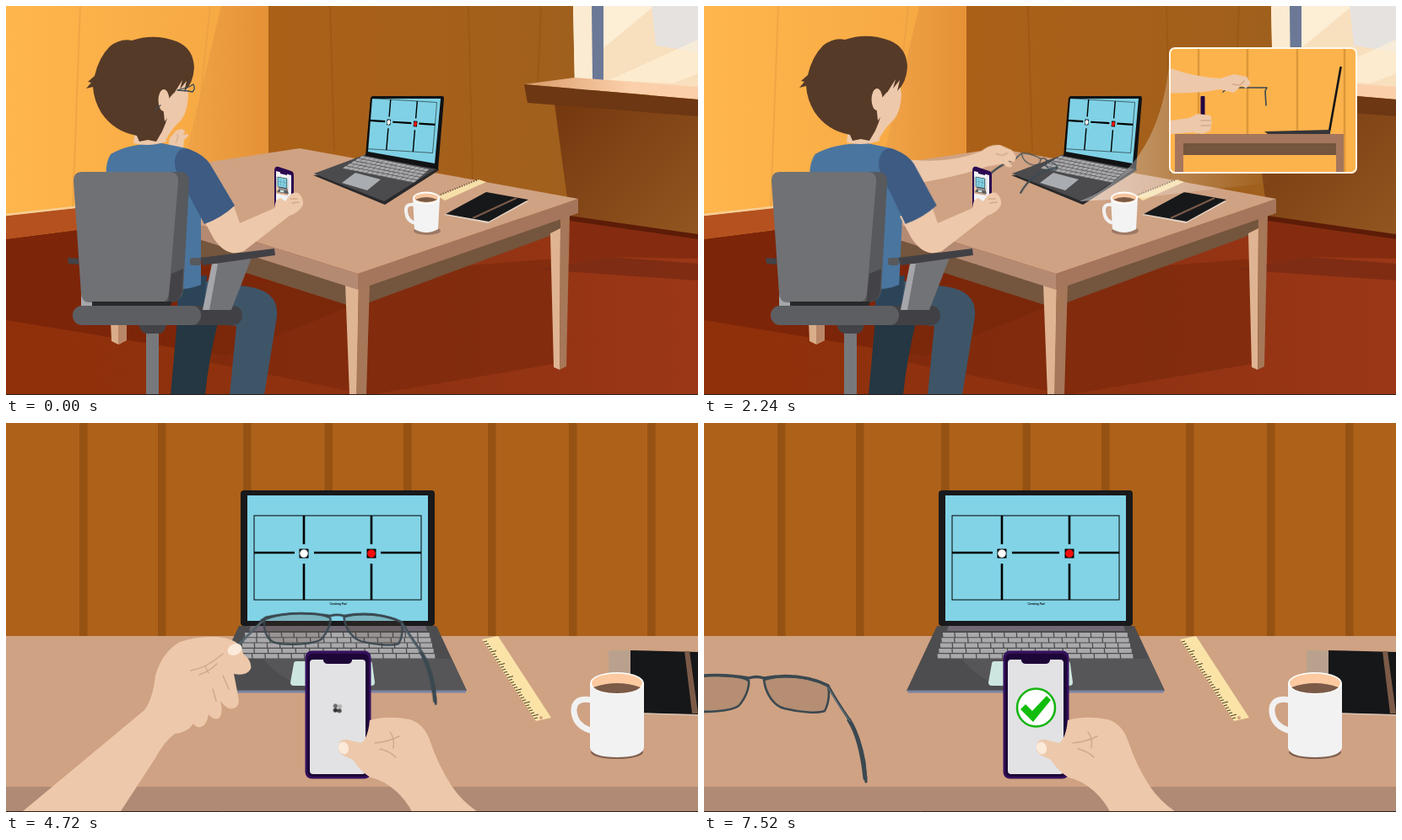
Write an HTML page that moves like this. It is 820 px wide and 462 px high and loops after 7.6 s.

```html
<!DOCTYPE html>
<html lang="en">
<head>
<meta charset="utf-8">
<title>Glasses check at the desk</title>
<style>
html, body { margin: 0; width: 100%; height: 100%; overflow: hidden; background: #ae6018; }
svg { display: block; width: 820px; height: 462px; }
text { font-family: Inter, sans-serif; }
.skin { fill: #edc8aa; }
.crease { fill: none; stroke: #d3a98a; stroke-width: 1.5; stroke-linecap: round; }
.nail { fill: #fbe9da; }
.wire { fill: none; stroke: #3a4850; stroke-linecap: round; stroke-linejoin: round; }
.bars { stroke-width: var(--bar, 2.6); }
.room, .desk, .head, .torso, .arm, .grip, .worn, .held, .farTemple, .inset, .reach,
.lefthand, .specs, .preview, .wait, .done {
  animation: 7.6s linear infinite;
}
.room { animation-name: room; animation-timing-function: step-end; }
.desk { animation-name: desk; animation-timing-function: step-end; }
@keyframes room { 0% { visibility: visible } 45.8%, 100% { visibility: hidden } }
@keyframes desk { 0% { visibility: hidden } 45.8%, 100% { visibility: visible } }

.head { animation-name: head; animation-timing-function: ease-in-out; }
@keyframes head {
  0%, 3% { transform: none }
  13.2% { transform: translate(17px, -1px) }
  29.5% { transform: translate(18px, -1px) }
  41%, 100% { transform: translate(23px, -.5px) }
}
.torso { transform-origin: 0 335px; animation-name: torso; animation-timing-function: ease-in-out; }
@keyframes torso {
  0%, 3% { transform: skewX(0deg) }
  13.2% { transform: skewX(-2.4deg) }
  29.5% { transform: skewX(-2.75deg) }
  41%, 100% { transform: skewX(-3deg) }
}
.arm { animation-name: arm; animation-timing-function: ease-in-out; }
@keyframes arm {
  0% { d: path("M192 190Q200 182 194 172L208 172Q215 182 215 195Z") }
  4.6% { d: path("M205 185Q225 165 208 133L224 137Q245 175 235 210Z") }
  13.2%, 20% { d: path("M225 180Q290 187 336 164L348 180Q300 200 235 213Z") }
  29.5% { d: path("M225 180Q285 190 327 173L340 189Q300 204 235 213Z") }
  41%, 100% { d: path("M225 180Q291 188 338 165L350 181Q302 201 235 213Z") }
}
.grip { transform-origin: 343px 170px; animation-name: grip; animation-timing-function: ease-in-out; }
@keyframes grip {
  0% { transform: translate(-142px, 1px) rotate(-70deg) scale(.75) }
  4.6% { transform: translate(-128px, -36px) rotate(-60deg) scale(.8) }
  13.2%, 20% { transform: none }
  29.5% { transform: translate(-8px, 9px) rotate(4deg) }
  41%, 100% { transform: translate(2px, 1px) }
}
.worn { animation-name: worn; animation-timing-function: step-end; }
@keyframes worn { 0% { opacity: 1 } 4.6%, 100% { opacity: 0 } }
.held { animation-name: held; animation-timing-function: step-end; }
@keyframes held { 0% { opacity: 0 } 4.6%, 100% { opacity: 1 } }
.farTemple { animation-name: farTemple; }
@keyframes farTemple {
  0%, 20% { d: path("M427 177Q427 178 426 179") }
  29.5% { d: path("M427 177Q398 184 386 210") }
  41%, 100% { d: path("M427 177Q427 178 426 179") }
}
.inset { animation-name: inset; }
@keyframes inset { 0%, 11.5% { opacity: 0 } 13.8%, 100% { opacity: 1 } }
.reach { animation-name: reach; animation-timing-function: ease-in-out; }
@keyframes reach { 0%, 29.5% { transform: none } 41%, 100% { transform: translate(13px, 0) } }

.lefthand { animation-name: lefthand; }
@keyframes lefthand {
  0%, 62.9% { transform: none }
  71.6% { transform: translate(-139px, 35px) }
  84.2%, 100% { transform: translate(-344px, 78px) }
}
.specs { animation-name: specs; }
@keyframes specs {
  0%, 62.9% { transform: matrix(.9, 0, 0, .85, 152, 8) }
  71.6% { transform: matrix(1, 0, 0, 1, 0, 0) }
  84.2%, 100% { transform: matrix(1, 0, 0, 1, -205, 43) }
}
.preview { animation-name: preview; animation-timing-function: step-end; }
@keyframes preview { 0% { opacity: 1 } 62.1%, 100% { opacity: 0 } }
.wait { animation-name: wait; animation-timing-function: step-end; }
@keyframes wait { 0% { opacity: 0 } 62.1% { opacity: 1 } 83.2%, 100% { opacity: 0 } }
.spin { transform-origin: 393px 339px; animation: spin .95s linear infinite; }
@keyframes spin { to { transform: rotate(360deg) } }
.done { transform-origin: 393.5px 338px; animation-name: done; animation-timing-function: ease-out; }
@keyframes done { 0%, 83.2% { transform: scale(0) } 85.5%, 100% { transform: scale(1) } }
</style>
</head>
<body>
<svg viewBox="0 0 820 462">
<defs>
  <linearGradient id="sun"><stop stop-color="#ffb64c"/><stop offset="1" stop-color="#f5a642"/></linearGradient>
  <linearGradient id="shade"><stop stop-color="#f2a548"/><stop offset="1" stop-color="#e59136"/></linearGradient>
  <linearGradient id="wood"><stop stop-color="#ab6017"/><stop offset="1" stop-color="#a0601d"/></linearGradient>
  <linearGradient id="panel" x2="1" y2="1"><stop stop-color="#75380f"/><stop offset="1" stop-color="#925621"/></linearGradient>
  <linearGradient id="floor"><stop stop-color="#8f300a"/><stop offset=".6" stop-color="#8f3212"/><stop offset="1" stop-color="#9b3716"/></linearGradient>
  <linearGradient id="sill"><stop stop-color="#d99b68"/><stop offset=".6" stop-color="#fbcfaa"/></linearGradient>
  <linearGradient id="beam"><stop stop-color="#fff" stop-opacity=".45"/><stop offset=".7" stop-color="#fff" stop-opacity="0"/></linearGradient>
  <clipPath id="frame"><rect x="552" y="50" width="221" height="148" rx="6"/></clipPath>
  <path id="keys" fill="#a9a9ac"/>
  <g id="chart" stroke="#000">
    <rect x="294" y="110" width="198" height="100" fill="none"/>
    <path class="bars" d="M353 110V144M353 167V210M433 110V144M433 167V210M294 154H342M365 154H421M444 154H492"/>
    <path d="M347.500 149.500h11v11h-11zM427.500 149.500h11v11h-11z" stroke="none"/>
    <circle cx="353" cy="155" r="4.800" fill="#fff" stroke="none"/>
    <circle cx="433" cy="155" r="4.800" fill="#f20d0d" stroke="none"/>
  </g>
  <g id="laptop">
    <path d="M276 241H510L546 318H240Z" fill="#4d4d4f"/>
    <path d="M305 280Q325 305 365 318H546L528 280Z" fill="#565658"/>
    <path d="M240 317.500H546L544 320.500H242Z" fill="#7c83a4"/>
    <path d="M290 240H497L499 247H288Z" fill="#716a75"/>
    <use href="#keys"/>
    <path d="M344 283H431Q434 283 434 286L437 308Q437 312 433 312H341Q337 312 337 308L341 286Q341 283 344 283Z" fill="#cde6df"/>
    <rect x="278" y="80" width="230" height="161" rx="4" fill="#19191b"/>
    <rect x="286" y="86" width="214" height="149" fill="#82d3e6"/>
    <use href="#chart"/>
  </g>
  <g id="shot">
    <path d="M367 319H417V364H367Z" fill="#cfa283"/>
    <path d="M367 319H417V346H367Z" fill="#b9d3da"/>
    <use href="#laptop" transform="matrix(.17 0 0 .17 325.500 305)"/>
    <path class="skin" d="M367 351Q372 341 377 347L376 354L367 361Z"/>
  </g>
</defs>

<g class="room">
  <!-- walls, window and floor -->
  <path d="M0 0H312V300H0Z" fill="url(#sun)"/>
  <path d="M255 0H312V220H203Z" fill="url(#shade)"/>
  <path d="M88 0L79 242M242 0L222 190" stroke="#e9a044" stroke-width="2" opacity=".65"/>
  <path d="M0 249L90 239V265L0 277Z" fill="#b5511f"/>
  <path d="M0 248L90 238" stroke="#f6cf96" stroke-width="2.500"/>
  <path d="M311 0H674V262H311Z" fill="url(#wood)"/>
  <path d="M384 0L389 172M548 0L553 205M634 0L630 95" stroke="#945311" stroke-width="2" opacity=".5"/>
  <path d="M0 277L90 265L200 262L660 250L820 274V462H0Z" fill="url(#floor)"/>
  <path d="M0 277L120 262L330 262L420 352L260 416L0 373Z" fill="#7d2508"/>
  <path d="M280 330L650 300V425L430 462L200 415Z" fill="#7b290c" opacity=".65"/>
  <path d="M668 254L820 277V300L715 298L668 306Z" fill="#852c10"/>
  <path d="M630 313L715 298L820 306V326Z" fill="#782a13" opacity=".8"/>
  <path d="M650 116L820 126V272L668 251Z" fill="url(#panel)"/>
  <path d="M667 249L820 271V277L668 255Z" fill="#5c1c07"/>
  <path d="M672 0H820V100H674Z" fill="#f8dfbd"/>
  <path d="M672 0H694L695 88H674Z" fill="#fbebd2"/>
  <path d="M694 0H708V88H695Z" fill="#6b7896"/>
  <path d="M708 0H768L708 50Z" fill="#fdeed6"/>
  <path d="M765 0H820V55L770 47Z" fill="#e6e2df"/>
  <path d="M715 88L820 40V80L790 92Z" fill="#fff1d8" opacity=".7"/>
  <path d="M614 93L674 85L820 96V111Z" fill="url(#sill)"/>
  <path d="M614 93L820 111V131L618 115Z" fill="#6c3712"/>

  <!-- table -->
  <path d="M124 374H143V397L133 402L125 398Z" fill="#d9ad89"/>
  <path d="M133 374H143V397L133 402Z" fill="#b98768"/>
  <path d="M200 250L417 330L410 357L200 290Z" fill="#74553d"/>
  <path d="M425 328L658 248V268L425 354Z" fill="#74553d"/>
  <path d="M645 270L657 264L656 432L649 429Z" fill="#dfb492"/>
  <path d="M657 250L668 247L664 428L656 432Z" fill="#a67759"/>
  <path d="M402 330H418L416 462H407Z" fill="#dfb492"/>
  <path d="M418 330H431L427 462H415Z" fill="#a67759"/>
  <path d="M150 235L417 318V337L150 252Z" fill="#b58a73"/>
  <path d="M417 318L678 229V246L417 337Z" fill="#a5765c"/>
  <path d="M348 169L678 229L417 318L150 235V199Z" fill="#cfa283"/>

  <!-- things on the table -->
  <path d="M512 226L560 206L569 209L520 231Z" fill="#f6dfa8"/>
  <path d="M515 224L560 206" stroke="#5d4932" stroke-dasharray="1 2" stroke-width="2"/>
  <path d="M569 222L619 232L571 258L519 248Z" fill="#e3d3c5"/>
  <path d="M569 221L619 230L572 256L521 247Z" fill="#17181a"/>
  <path d="M605 228L553 252" stroke="#7a5a48" stroke-width="2"/>
  <path d="M364 201L449 236L513 195L511 191Z" fill="#29292b"/>
  <path d="M427 176L512 192L448 232L365 199Z" fill="#4b4b4e"/>
  <use href="#keys" transform="matrix(.364 .073 -.68 .5 488.300 32.800)"/>
  <path d="M414 198L444 206L428 219L398 210Z" fill="#a9acb0"/>
  <path d="M434 107H517Q519 107 519 110L512 194L426 178L432 109Z" fill="#111214"/>
  <path d="M434 110H515L508 187L429 173Z" fill="#80d1e5"/>
  <use href="#chart" style="--bar: 3.6" transform="matrix(.394 .025 -.05 .6 322.200 36.200)"/>
  <g class="inset"><path d="M552 60C547 125 525 200 445 232L515 228L772 198L552 198Z" fill="url(#beam)"/></g>
  <ellipse cx="499" cy="267" rx="16" ry="5" fill="#9d7a65"/>
  <path d="M484 236Q473 234 474 244Q475 256 486 258" fill="none" stroke="#f1f1f1" stroke-width="4"/>
  <path d="M482 228H514L512 265Q498 273 484 265Z" fill="#f3f3f3"/>
  <ellipse cx="498" cy="228" rx="16" ry="7.500" fill="#fff"/>
  <ellipse cx="498" cy="228" rx="14" ry="5.500" fill="#f6c59e"/>
  <path d="M485 230Q498 224 511 230Q498 236 485 230Z" fill="#7a5a47"/>

  <!-- person -->
  <path class="skin arm" d="M225 180Q290 187 336 164L348 180Q300 200 235 213Z"/>
  <g class="grip">
    <g class="held wire" stroke-width="1.200">
      <path d="M342 199Q350 184 378 169" stroke-width="2.200"/>
      <path d="M378 169L384 163Q396 162 407 168Q407 177 398 176Q386 174 384 163M407 168Q412 166 414 169Q424 171 428 177Q425 182 419 180Q412 177 414 169"/>
      <path class="farTemple" d="M427 177Q427 178 426 179" stroke-width="2"/>
    </g>
    <path class="skin" d="M334 166Q345 154 358 155L372 160L378 168L376 174L369 173L374 179Q370 183 363 177L347 181Z"/>
    <path class="crease" d="M354 166L362 167L367 164" stroke-width=".8"/>
  </g>
  <path d="M203 372H252Q240 420 236 462H195Z" fill="#243743"/>
  <path d="M203 322L285 333Q324 338 321 369L306 462H265L273 380L203 374Z" fill="#3e5568"/>
  <path d="M203 322L238 320L234 362H203Z" fill="#2c4457"/>
  <g class="torso">
    <path d="M120 215Q116 188 124 176Q145 163 185 163L214 169Q231 178 231 220V331Q212 339 190 335L120 330Z" fill="#4a759f"/>
  </g>
  <path d="M318 196Q318 190 323 191L338 196Q341 197 341 201V238L318 240Z" fill="#2b0850"/>
  <path d="M320 196L338 201V236L320 238Z" fill="#f1f1f4"/>
  <path d="M325 196L333 198V201L325 199Z" fill="#2b0850"/>
  <use href="#shot" transform="matrix(.28 .05 0 .44 217.500 44)"/>
  <path class="skin" d="M232 250L268 232L277 258L318 240Q319 229 325 228L331 232Q338 219 346 222Q353 227 352 236Q348 245 336 249L282 291Q262 300 246 276Z"/>
  <path class="crease" d="M337 229L345 229M339 234L347 233" stroke-width=".8"/>
  <g class="torso">
    <path d="M200 183Q203 166 217 170Q235 177 242 188L271 237Q255 252 235 259L208 208Q199 195 200 183Z" fill="#3d5b83"/>
  </g>
  <g class="head">
    <path class="skin" d="M153 146L188 138L190 161Q170 168 151 163Z"/>
    <path class="skin" d="M177 150L178 100L213 84L216 106Q215 127 207 136Q197 145 190 158Z"/>
    <path d="M158 161L155 154Q128 149 113 127Q104 112 103 96L95 98L101 91L97 90L105 83Q110 61 123 48Q136 38 149 41Q175 32 202 42Q222 50 223 73Q222 92 211 102L214 89L206 99L209 88L197 107Q193 132 185 149L178 161L168 159Z" fill="#553a28"/>
    <ellipse class="skin" cx="187" cy="112" rx="6.500" ry="13"/>
    <path class="skin" d="M186 118L199 103L197 126L188 137Z"/>
    <path class="worn wire" d="M177 123L183 118M203 100L217 96L222 93Q225 98 221 102L216 101Z" stroke-width="1.300"/>
  </g>

  <!-- chair -->
  <path d="M73 299L86 300V307L74 306Z" fill="#434347"/>
  <path d="M89 342L103 352V358H89Z" fill="#a4a6aa"/>
  <path d="M195 197H207Q218 198 217 210L210 338Q208 352 192 352H178Z" fill="#58595c"/>
  <path d="M196 318L210 312L209 338Q207 352 192 352Z" fill="#434347"/>
  <path d="M90 197H193Q205 197 204 209L193 341Q192 352 181 352H99Q90 352 89 342L80 208Q80 197 90 197Z" fill="#707175"/>
  <path d="M102 351H197L194 358H102Z" fill="#29292b"/>
  <path d="M166 384H181V462H166Z" fill="#77787c"/>
  <path d="M157 376H190Q189 389 180 389H167Q158 388 157 376Z" fill="#434347"/>
  <rect x="205" y="356" width="75" height="23" rx="11" fill="#414145"/>
  <rect x="79" y="356" width="152" height="23" rx="11" fill="#5d5e62"/>
  <path d="M246 306L291 299L267 361H233Z" fill="#727377"/>
  <path d="M244 306H251L241 361H233Z" fill="#a4a6aa"/>
  <path d="M230 299L318 288L319 296L233 308Z" fill="#414145"/>
  <rect x="218" y="299" width="13" height="9" rx="3" fill="#58595c"/>

  <!-- side view -->
  <g class="inset">
    <g clip-path="url(#frame)">
      <path d="M552 50H773V198H552Z" fill="#fdb34c"/>
      <path d="M586 51V152M644 51V152M703 51V152M759 51V197" stroke="#dc973a" stroke-width="2.500"/>
      <path d="M558 152H758V197H749V163H568V197H558Z" fill="#a5765c"/>
      <path d="M568 163H749V177H568Z" fill="#74553d"/>
      <path d="M754.500 73L741 149" stroke="#151517" stroke-width="2.600" stroke-linecap="round"/>
      <path d="M664 149L742 147V152H668Z" fill="#353539"/>
      <rect x="588.500" y="107" width="5" height="44" rx="1" fill="#250741"/>
      <path class="skin" d="M553 136L575 133L585 128L600 130Q603 136 600 148Q590 154 580 150L553 152Z"/>
      <path class="crease" d="M589 136H600M589 142H600" stroke-width=".8"/>
      <g class="reach">
        <path class="wire" d="M615 102L621 97L667 97L665 101L666 118" stroke-width="1.600"/>
        <path class="skin" d="M535 72L553 74Q580 84 612 86L628 81L643 84L648 92L642 98L637 94L628 103L612 99Q580 105 535 103Z"/>
        <path class="crease" d="M626 93L635 94L640 89" stroke-width=".8"/>
      </g>
    </g>
    <rect x="552" y="50" width="221" height="148" rx="6" fill="none" stroke="#fff8ea" stroke-width="2"/>
  </g>
</g>

<g class="desk">
  <path d="M0 0H820V254H0Z" fill="#ae6119"/>
  <path id="planks" fill="#955213"/>
  <path d="M0 253H820V433H0Z" fill="#cfa283"/>
  <path d="M0 432H820V462H0Z" fill="#b08a74"/>
  <use href="#laptop"/>
  <text x="393.500" y="215.500" font-size="3.200" font-weight="600" text-anchor="middle">Centring Pad</text>

  <path d="M564 257L583 253L646 350L628 354Z" fill="#fbe3a8"/>
  <path id="ticks" stroke="#4a3b25" fill="none"/>
  <circle cx="634" cy="350" r="2" fill="#d3a283"/>
  <path d="M714 270H742V346H714Z" fill="#b9a18e"/>
  <path d="M740 270L820 272V346L740 344Z" fill="#161719"/>
  <path d="M755 345L820 347" stroke="#d8d0c8"/>
  <path d="M804 271H810L820 345H813Z" fill="#7c5b48"/>
  <ellipse cx="724" cy="391" rx="31" ry="8" fill="#80604f"/>
  <path d="M694 329Q672 325 673 343Q675 361 696 366" fill="none" stroke="#f1f1f1" stroke-width="7"/>
  <path d="M692 309H756V386Q753 397 724 397Q695 397 692 386Z" fill="#f2f2f2"/>
  <ellipse cx="724" cy="309" rx="32" ry="13" fill="#fff"/>
  <ellipse cx="724" cy="309" rx="30" ry="11.500" fill="#fcc9a0"/>
  <path d="M696 314Q724 304 752 314Q744 321 724 321Q704 321 696 314Z" fill="#7b5b48"/>

  <g class="specs wire">
    <path d="M126 312L170 266" stroke-width="3.200" stroke="#56646b"/>
    <g fill="#5a4a3c" fill-opacity=".22" stroke-width="2.600">
      <path d="M172 265C168 279 176 296 187 298C206 302 238 299 246 293C255 283 259 270 258 263C242 254 196 254 172 265Z"/>
      <path d="M276 262C278 279 288 293 300 296C320 301 340 302 348 299C354 288 354 273 351 268C332 258 296 255 276 262Z"/>
    </g>
    <path d="M167 267L174 262Q215 252 258 260Q267 257 276 260Q318 252 352 269" stroke-width="3.400"/>
    <path d="M352 269Q360 284 377 309Q390 330 395 360L397 383" stroke-width="3.200"/>
    <path d="M377 310Q391 332 396 379" stroke-width="5"/>
    <path d="M352 271Q364 292 378 311" stroke="#71828b" stroke-width="1"/>
  </g>
  <g class="lefthand">
    <path class="skin" d="M-120 600L20 461L164 341Q174 328 177 300Q185 272 206 260Q234 251 258 255Q279 259 281 274Q292 283 290 292Q285 301 270 298Q274 318 276 330Q275 341 264 339Q258 336 254 330Q258 346 252 351Q245 353 240 346Q238 359 231 361Q225 362 222 357Q216 367 200 369Q187 379 177 398L136 461L40 600Z"/>
    <path class="crease" d="M219 294Q238 291 257 274M229 299Q241 295 250 286M236 289L240 297"/>
    <path class="crease" d="M257 300L264 316M245 316L249 330" stroke-width="1"/>
    <ellipse class="nail" cx="271" cy="269" rx="9" ry="6.500" transform="rotate(-25 271 269)"/>
  </g>

  <rect x="354.500" y="270.500" width="78" height="152" rx="8" fill="#35105c"/>
  <rect x="357" y="274" width="73" height="146" rx="6" fill="#1d0638"/>
  <rect x="360" y="281" width="66" height="136" rx="4" fill="#e2e2e4"/>
  <path d="M376 278H410V282Q409 286 405 286H381Q377 286 376 282Z" fill="#1d0638"/>
  <g class="preview"><use href="#shot"/></g>
  <g class="wait"><g class="spin">
    <circle cx="391" cy="335.500" r="2.600" fill="#6a6a6a"/>
    <circle cx="396" cy="337" r="2.600" fill="#b4b4b4"/>
    <circle cx="394.500" cy="342" r="2.600" fill="#4a4a4a"/>
    <circle cx="390" cy="340.500" r="2.600" fill="#303030"/>
  </g></g>
  <g class="done">
    <circle cx="393.500" cy="338" r="22.500" fill="#fff" stroke="#17b513" stroke-width="2.600"/>
    <path d="M375 340L381 334L389 342L406 324L411 329L390 355Z" fill="#12bd0e"/>
  </g>
  <path class="skin" d="M394 383Q395 375 404 376L421 380Q429 374 431 353Q452 347 478 352Q496 357 503 379Q512 406 528 431Q540 449 559 462H481Q475 449 462 437Q447 424 432 421Q420 414 411 400L398 394Q393 390 394 383Z"/>
  <path class="crease" d="M437 380Q452 379 466 372M443 387Q455 390 462 397M455 367Q461 374 459 386"/>
  <ellipse class="nail" cx="400" cy="386" rx="6" ry="7.500" transform="rotate(-20 400 386)"/>
</g>
<path d="M0 461.500H820" stroke="#2b211c"/>
</svg>
<script>
const setPath = (id, d) => document.getElementById(id).setAttribute("d", d);

// Keyboard rows widen towards the viewer.
let keys = "";
for (let row = 0; row < 5; row++) {
  const y = 249 + row * 6.3, grow = row * 1.6;
  const left = 283 - grow, width = 220 + grow * 2, count = 15 - row % 2;
  const step = width / count;
  for (let i = 0; i < count; i++) {
    keys += `M${left + i * step} ${y}h${step - 1.3}l.4 5.2h${-step + 1.3}z`;
  }
}
setPath("keys", keys);

setPath("planks", [87, 180, 281, 377.5, 471, 571, 667, 760].map(x => `M${x} 0h9.5V253h-9.5z`).join(""));

let ticks = "";
for (let i = 1; i < 32; i++) {
  const x = 564 + i * 2, y = 257 + i * 3.03, len = i % 5 ? 4 : 7;
  ticks += `M${x} ${y}l${len} ${-len * .25}`;
}
setPath("ticks", ticks);
</script>
</body>
</html>
```
